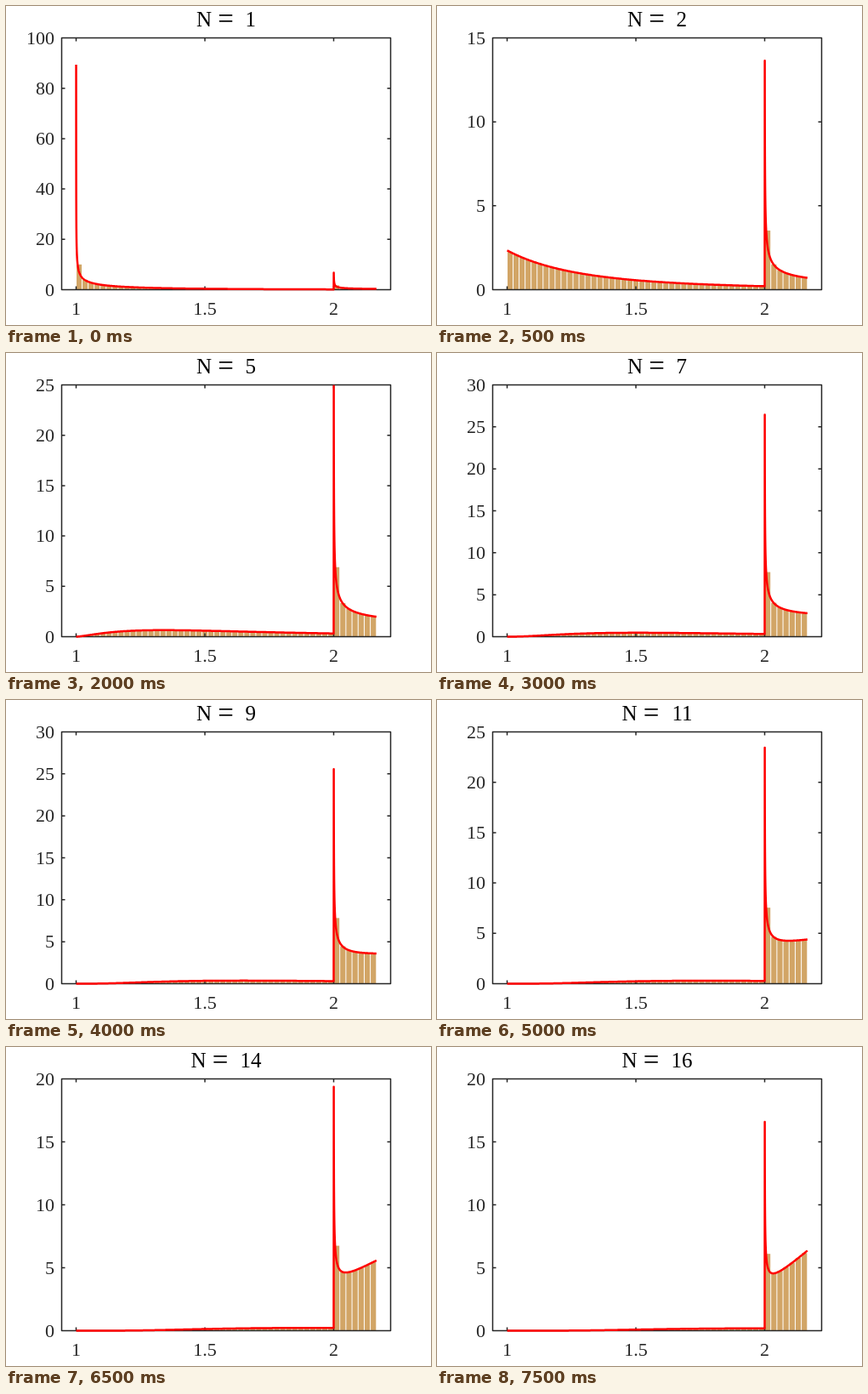
An HTML page with a canvas that plays this animation: 500 px wide and 375 px high, repeating every 8000 ms.

```html
<!DOCTYPE html>
<html>
<head>
<meta charset="utf-8">
<style>
html, body { margin: 0; width: 100%; height: 100%; overflow: hidden; background: #fff; }
canvas { display: block; }
</style>
</head>
<body>
<canvas id="stage" width="500" height="375"></canvas>
<script>
const ctx = document.getElementById('stage').getContext('2d');
const INK = '#262626', BAR = '#d2a566', FONT = '"Liberation Serif", "Noto Serif", serif';
const LEFT = 65.5, RIGHT = 452.5, TOP = 37.5, BOTTOM = 333.5;
const STEP_MS = 500, STEPS = 16;
const EDGE = 0.859;              // radius at which x jumps to the second branch
const TAIL = 0.166;              // length of the second branch
const POWER = 2.5;               // falloff of the first branch
const SCALE = EDGE ** 2 / (1 - 2 ** -POWER);
const RISE = 0.143, BEND = 0.003;

const px = x => 82.5 + (x - 1) * 303;

// Radius and its derivative on each branch
const radiusLow = x => Math.sqrt(SCALE * (1 - x ** -POWER));
const slopeLow = x => SCALE * POWER * x ** (-POWER - 1) / (2 * radiusLow(x));
const radiusHigh = v => EDGE + RISE * (v / TAIL) ** 0.5 - BEND * (v / TAIL) ** 1.5;
const slopeHigh = v => (RISE * (v / TAIL) ** -0.5 - 3 * BEND * (v / TAIL) ** 0.5) / (2 * TAIL);

// Density and cumulative mass of both branches in dimension n
function model(n) {
  const high = 1 - 0.5 ** (n + 1);
  const low = (1 - high * (1 - EDGE ** n)) / EDGE ** n;
  return {
    low: u => low * n * radiusLow(1 + u) ** (n - 1) * slopeLow(1 + u),
    high: v => high * n * radiusHigh(v) ** (n - 1) * slopeHigh(v),
    lowMass: u => low * radiusLow(1 + u) ** n,
    highMass: v => high * radiusHigh(v) ** n
  };
}

function label(text, x, y, size, align) {
  ctx.font = `${size}px ${FONT}`;
  ctx.textAlign = align;
  ctx.fillText(text, x, y);
}

function bars(count, start, length, mass, py) {
  const w = length / count;
  for (let i = 0; i < count; i++) {
    const height = (mass((i + 1) * w) - mass(i * w)) / w;
    const y = py(height);
    ctx.fillRect(px(start + i * w) + 0.5, y, w * 303 - 1, BOTTOM - y);
  }
}

// Points are packed toward the start, where the curve is steepest
function trace(start, first, length, density, py) {
  const a = Math.sqrt(first), b = Math.sqrt(length), count = 300;
  for (let i = 0; i <= count; i++) {
    const d = (a + (b - a) * i / count) ** 2;
    ctx.lineTo(px(start + d), py(density(d)));
  }
}

function axes(max, py) {
  ctx.strokeStyle = ctx.fillStyle = INK;
  ctx.lineWidth = 1.5;
  ctx.beginPath();
  ctx.rect(LEFT, TOP, RIGHT - LEFT, BOTTOM - TOP);
  for (const x of [1, 1.5, 2]) {
    ctx.moveTo(px(x), TOP); ctx.lineTo(px(x), TOP + 4);
    ctx.moveTo(px(x), BOTTOM); ctx.lineTo(px(x), BOTTOM - 4);
    label(x, px(x), 362.5, 22, 'center');
  }
  for (let v = 0, step = max > 50 ? 20 : 5; v <= max; v += step) {
    const y = py(v);
    ctx.moveTo(LEFT, y); ctx.lineTo(LEFT + 4, y);
    ctx.moveTo(RIGHT, y); ctx.lineTo(RIGHT - 4, y);
    label(v, 57, y + 7, 22, 'right');
  }
  ctx.stroke();
}

function title(n) {
  const shift = n > 9 ? 6.5 : 0;
  ctx.fillStyle = '#000';
  label('N', 224 - shift, 24, 25, 'left');
  label('=', 258.5 - shift, 25.5, 33, 'center');
  label(n, 294 + shift, 24, 25, 'right');
}

function draw(n) {
  const m = model(n), firstLow = 7.6e-5, firstHigh = 3.8e-4;
  const max = n === 1 ? 100 : Math.ceil(m.high(firstHigh) / 5) * 5;
  const py = v => BOTTOM - v / max * (BOTTOM - TOP);

  ctx.fillStyle = '#fff';
  ctx.fillRect(0, 0, 500, 375);
  ctx.fillStyle = BAR;
  bars(43, 1, 1, m.lowMass, py);
  bars(7, 2, TAIL, m.highMass, py);
  axes(max, py);

  ctx.strokeStyle = '#f00';
  ctx.lineWidth = 2.5;
  ctx.lineJoin = 'round';
  ctx.beginPath();
  trace(1, firstLow, 1, m.low, py);
  trace(2, firstHigh, TAIL, m.high, py);
  ctx.stroke();
  title(n);
}

function tick() {
  draw(Math.floor(performance.now() / STEP_MS) % STEPS + 1);
  requestAnimationFrame(tick);
}
tick();
</script>
</body>
</html>
```
